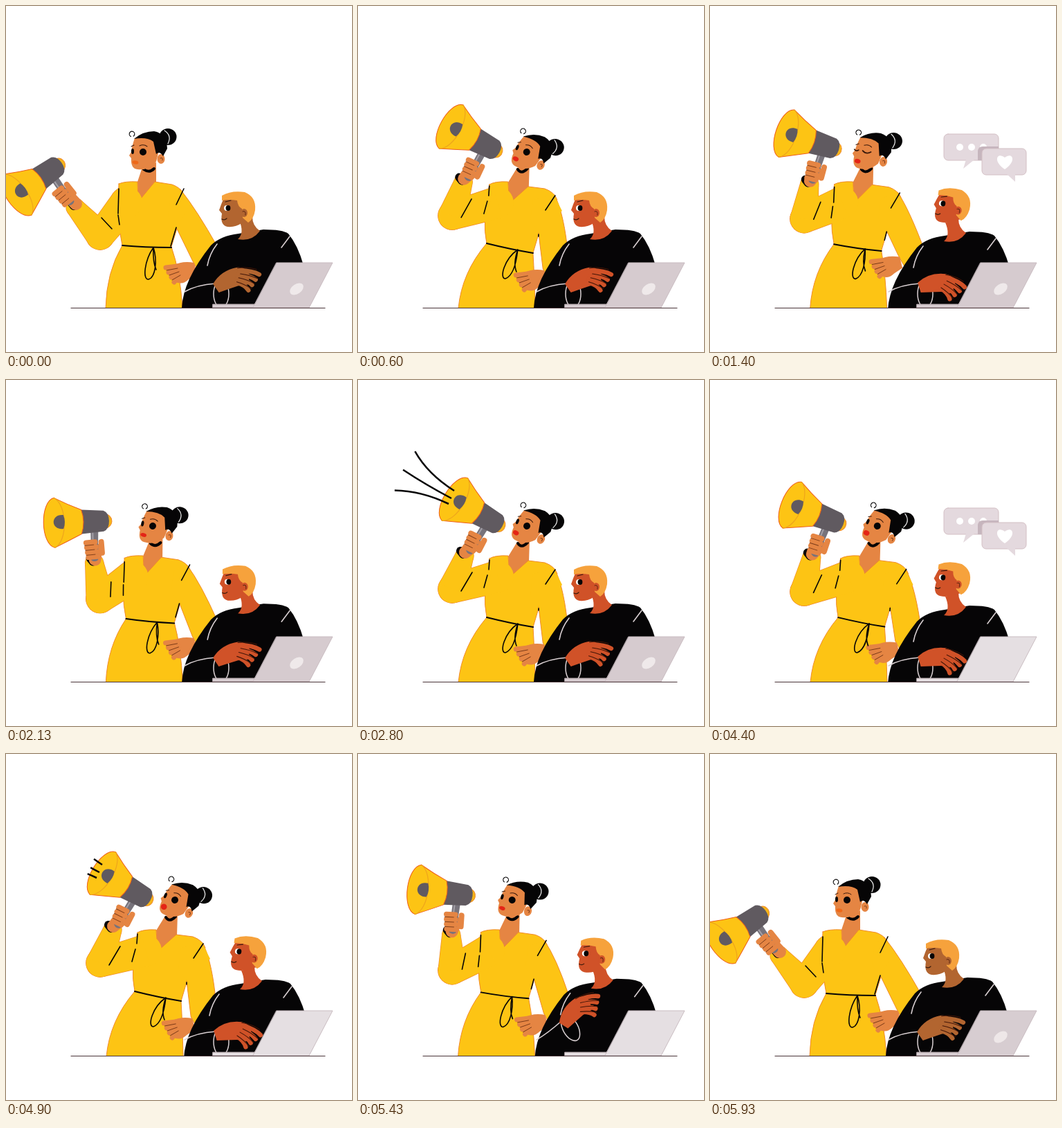
Write an HTML page with a canvas that moves like this. It is 500x500 px and loops after 6.01 s.

```html
<!DOCTYPE html>
<html lang="en">
<head>
<meta charset="utf-8">
<title>Announcement</title>
<style>
html, body { margin: 0; width: 100%; height: 100%; overflow: hidden; background: #fff }
canvas { display: block; width: 500px; height: 500px }
</style>
</head>
<body>
<canvas id="stage" width="500" height="500"></canvas>
<script>
const c = document.getElementById('stage').getContext('2d');
const LOOP = 6010, YELLOW = '#fdc414', EDGE = '#f08a2a', BLACK = '#060506',
  SKIN = '#e58543', CREASE = '#7a3a18', GREY = '#605a60', LINE = '#d9d0d2';

// The woman raises the megaphone three times in a loop
const RISE = [40, 2000, 3930], FALL = [1180, 3130, 5205];

const clamp = x => Math.min(1, Math.max(0, x));
const ease = x => (x = clamp(x)) * x * (3 - 2 * x);
const lerp = (a, b, k) => a + (b - a) * k;
const pulse = (t, from, to, d) => ease((t - from) / d) * (1 - ease((t - to) / d));

// Swing up to 1 on each beat, then down to that beat's low point
function swing(t, lows) {
  return lows.reduce((v, low, i) =>
    lerp(lerp(v, 1, ease((t - RISE[i]) / 630)), low, ease((t - FALL[i]) / 560)), 0);
}

// Blend two path or colour strings of the same structure
const NUM = /-?\d+(\.\d+)?/g;
function mix(a, b, k) {
  const to = b.match(NUM);
  let i = 0;
  return a.replace(NUM, v => lerp(+v, +to[i++], k).toFixed(2));
}

function fill(d, color, edge) {
  const p = new Path2D(d);
  c.fillStyle = color;
  c.fill(p);
  if (edge) { c.strokeStyle = edge; c.lineWidth = 1; c.stroke(p) }
}
function line(d, color = BLACK, width = 1.6) {
  c.strokeStyle = color;
  c.lineWidth = width;
  c.stroke(new Path2D(d));
}
function oval(x, y, rx, ry, color, rot = 0, edge) {
  c.beginPath();
  c.ellipse(x, y, rx, ry, rot, 0, 7);
  c.fillStyle = color;
  c.fill();
  if (edge) { c.strokeStyle = edge; c.lineWidth = 1.5; c.stroke() }
}
function group(x, y, deg, draw, px = 0, py = 0, size = 1) {
  c.save();
  c.translate(x, y);
  c.rotate(deg * Math.PI / 180);
  c.scale(size, size);
  c.translate(-px, -py);
  draw();
  c.restore();
}

// Tapered limb segment with round ends
function taper(x1, y1, r1, x2, y2, r2, color) {
  const a = Math.atan2(y2 - y1, x2 - x1), s = Math.sin(a), k = Math.cos(a);
  oval(x1, y1, r1, r1, color);
  oval(x2, y2, r2, r2, color);
  fill(`M${x1 - s * r1} ${y1 + k * r1} L${x2 - s * r2} ${y2 + k * r2}
    L${x2 + s * r2} ${y2 - k * r2} L${x1 + s * r1} ${y1 - k * r1} Z`, color);
}

function dress(b) {
  fill(mix('M198 230 L217 226 L217 254 L191 284 L190 254 Z',
    'M230 234 L248 230 L247 262 L219 286 L217 255 Z', b), SKIN);
  line(mix('M199 236 Q207 242 214 235', 'M231 236 Q236 244 245 235', b), BLACK, 4);
  fill(mix('M163 257 Q172 253 190 254 L191 283 L215 254 L240 258 Q251 262 256 270 L246 325 L239 348 Q252 385 255 437 L144 437 Q145 385 168 346 Q160 310 163 257 Z',
    'M190 258 Q198 253 217 254 L219 285 L246 261 L270 264 Q284 269 288 280 L261 330 L253 357 Q255 390 256 437 L145 437 Q150 385 186 343 Q179 310 190 258 Z', b), YELLOW, EDGE);
}

function hipArm(b, y) {
  const x = 246 - (y - 385) * .25, out = (396 - y) * .4, pit = 246 + 15 * b;
  fill(`M${252 + 32 * b} ${265 + 8 * b} Q${276 + 20 * b} 295 ${302 + out} ${345 + out}
    L${x + 34} ${y + 2} L${x + 24} ${y - 16} L${pit} ${320 + 8 * b} Z`, YELLOW, EDGE);
  fill(`M${pit} ${322 + 6 * b} l-12 -18 l4 -30 l${14 + 16 * b} -8 l12 24 Z`, YELLOW);
  group(x, y, 0, () => {
    fill('M26 -14 Q8 -17 -4 -10 L-12 2 L-4 12 Q8 20 18 10 L30 2 Z', SKIN);
    for (let i = 0; i < 4; i++) line(`M${2 + i} ${i * 4 - 9} L${i * 4 - 15} ${i * 7 - 7}`, SKIN, 7);
    for (let i = 0; i < 3; i++) line(`M${2 + i * 2} ${i * 5 - 6} L${i * 4 - 14} ${i * 7 - 3}`, CREASE, 1);
  });
}

function seams(b, u) {
  line(mix('M168 346 Q200 349 239 349', 'M186 343 Q222 352 253 357', b), BLACK, 2);
  line(mix('M213 349 C200 368 197 396 206 395 C216 392 219 368 213 349 Q212 370 217 381',
    'M231 352 C211 366 204 394 213 394 C224 390 229 370 231 352 Q224 372 229 384', b));
  line(mix('M257 264 L246 287 M163 264 L162 300 M246 320 L238 347',
    'M285 274 L271 295 M190 260 L189 274 M261 330 L261 333', b));
  line(mix('M162 302 L164 316', 'M187 282 Q182 300 185 313', b));
  line(mix('M138 306 L153 322', 'M165 278 L149 305', u));
}

function womanHead(b, h, mouth, warm, blink) {
  group(198 + 46 * b, 211, 22 * h, () => {
    oval(234, 189, 12.5, 12, BLACK);
    line('M229 180 Q240 187 234 199', '#eee', 1.2);
    oval(224, 221, 5.5, 7, SKIN);
    fill('M186 191 Q182 202 181 211 L178 216 L181 220 Q180 235 190 236 Q206 238 217 225 L222 205 L214 187 Z', SKIN);
    fill('M185 192 Q198 181 214 181 Q232 184 233 206 L227 217 Q222 209 217 214 L213 196 Q204 189 185 192 Z', BLACK);
    c.beginPath();
    c.arc(182, 185, 3.8, 2, 7.2);
    c.strokeStyle = BLACK;
    c.lineWidth = 1.2;
    c.stroke();
    if (blink > .5) {
      line('M192 210 Q198 215 204 210 M180 210 Q183 213 186 210', '#3a1a0c', 1.8);
    } else {
      oval(198, 211, 5, 5, BLACK);
      oval(183, 210, 2, 4, BLACK);
    }
    line('M193 202 Q199 199 204 203 M181 203 L185 201', '#3a1a0c', 1);
    line('M223 220 Q227 218 226 223', CREASE, 1);
    oval(187, 226, 4.4, 2.6 + 2 * mouth, mix('rgb(238 104 24)', 'rgb(228 36 22)', warm), .1);
  }, 198, 211);
}

function megaphone() {
  fill('M-7 12 L4 13 L3 56 Q-2 60 -7 56 Z', '#77737b');
  line('M-4 16 L-4 52', '#a39fa6', 2);
  fill('M14 -10 Q24 -9 24 1 Q23 9 14 11 Z', '#f5b518', EDGE);
  fill('M-20 -17 L12 -15 Q20 -12 20 0 Q20 12 12 15 L-20 18 Z', GREY);
  fill('M-59 -35 Q-40 -25 -20 -17 Q-14 0 -20 18 Q-40 28 -59 37 C-80 32 -80 -30 -59 -35 Z', YELLOW, '#ee5e1c');
  line('M-59 -35 C-40 -25 -40 28 -59 37', '#eea51c', 1.2);
  fill('M-46 -10 Q-42 0 -46 10 C-65 12 -65 -12 -46 -10 Z', GREY);
}

const wristAt = u => [100 + 54 * u, 291 - 37 * Math.sqrt(u)];

function sleeve(u, b, color, grow) {
  const [wx, wy] = wristAt(u), ex = 136, ey = 332 - 30 * u;
  taper(174 + 28 * b, 284, 23 + grow, ex, ey, 20 + grow, color);
  taper(ex, ey, 20 + grow, wx, wy, 13 + grow, color);
}

function speakHand(u) {
  const x = 64 + 127 * u, y = 238 - 36 * (1 - (1 - u) ** 4), deg = 66 * u - 35;
  const a = deg * Math.PI / 180, [wx, wy] = wristAt(u);
  const gx = x - 41 * Math.sin(a), gy = y + 41 * Math.cos(a);
  line(`M${wx - 6} ${wy - 7} l4 5`, BLACK, 12);
  line(`M${gx} ${gy} L${wx + 1} ${wy - 5}`, SKIN, 18);
  group(x, y, deg, () => {
    megaphone();
    for (let i = 0; i < 4; i++) line(`M${i - 14} ${31 + i * 7} l13 -1`, SKIN, 7.5);
    for (let i = 0; i < 3; i++) line(`M${i - 16} ${35 + i * 7} l13 -1`, CREASE, .9);
    line('M8 30 L9 46', SKIN, 8);
  });
}

function rays(t) {
  const p = (t + 152) % 240 / 240, size = 120;
  const tip = clamp(p / .45), tail = clamp((p - .4) / .6);
  c.save();
  c.lineCap = 'butt';
  c.setLineDash([size * (tip - tail), 999]);
  c.lineDashOffset = -size * tail;
  line('M139 160 Q87 127 72 79 M135 171 Q78 141 30 105 M131 179 Q73 151 17 163', BLACK, 2.5);
  c.restore();
}

function man(m, deg, lift, skin) {
  c.save();
  c.translate(3 * m, 3 * m);
  fill(`M254 436 Q256 396 296 346 Q310 332 336 329 L372 323 Q400 323 408 329 Q422 346 430 375 V${436 - 3 * m} Z`, BLACK);
  line('M305 344 Q294 358 291 375 M410 333 L398 349', LINE);
  fill('M337 310 L356 304 Q356 318 367 325 Q355 341 335 337 Q345 328 337 310 Z', skin);
  c.restore();
  group(348 + 12 * m, 318 - 3 * m, 8 * m, () => {
    fill('M315 277 Q311 286 308 295 L312 300 Q309 317 320 319 Q332 320 340 314 L352 310 L352 280 Z', skin);
    fill('M312 274 Q326 266 345 269 Q362 276 360 295 Q358 308 350 313 L342 306 L341 293 Q335 290 334 281 Q322 279 312 281 Z', '#f6a23c');
    oval(344, 299, 5, 6, skin);
    line('M342 297 Q347 295 346 302', '#5a2410', 1);
    oval(319, 292, 4, 4, '#fff');
    oval(321, 292, 3.4, 4, BLACK);
    line('M317 283 L325 281 M312 308 Q316 310 319 307', '#3a1a0c', 1.2);
  }, 348, 318);

  const x = 306 - 8 * lift, y = 404 - 16 * lift;
  line(`M258 413 Q275 403 ${x - 3} ${y - 3}`, LINE);
  oval(x + 5 + 4 * lift, y + 12 - 4 * lift, 11, 20, BLACK, -.5 * lift, LINE);
  group(x, y, deg, () => {
    fill('M-6 -4 Q10 -20 34 -18 Q46 -16 48 -5 L44 10 L28 8 Q12 9 -1 10 Z', skin);
    for (let i = 0; i < 4; i++)
      line(`M${36 - 3 * i} ${5 * i - 13} Q${54 - 5 * i} ${6 * i - 8} ${62 - 7 * i} ${6 * i}`, skin, 6.5);
    for (let i = 0; i < 3; i++)
      line(`M${36 - 4 * i} ${5 * i - 8} Q${50 - 6 * i} ${5 * i - 2} ${58 - 6 * i} ${6 * i + 5}`, '#431608', 1.1);
    line('M34 -17 Q50 -15 60 -8', '#431608', 1.1);
  });
}

function laptop(k) {
  const color = mix('rgb(214 203 207)', 'rgb(229 223 226)', k);
  fill('M299 431 H360 V436 H299 Z', color, '#b3a5aa');
  fill('M391 371 H472 L438 436 H357 Z', color, '#c9bcc1');
  oval(420, 409, 11, 7, `rgba(245,240,240,${.8 - .8 * k})`, -.6);
}

function bubble(x, y, w, h, tail) {
  c.beginPath();
  c.roundRect(x, y, w, h, 6);
  c.fillStyle = '#e4d9de';
  c.strokeStyle = '#d3bfc4';
  c.lineWidth = 1;
  c.fill();
  c.stroke();
  fill(tail, '#e4d9de');
}

function bubbles(s) {
  c.globalAlpha = s;
  group(370, 232, 0, () => {
    bubble(338, 185, 79, 38, 'M370 222 L366 235 L382 222 Z');
    for (const x of [361, 378, 395]) oval(x, 204, 5, 5, '#fff');
    fill('M387 223 V209 Q388 203 394 203 H417 V223 Z', '#c6b5bd');
  }, 370, 232, s);
  group(436, 250, 0, () => {
    bubble(393, 206, 64, 38, 'M429 243 L441 254 V243 Z');
    fill('M426 236 C408 224 415 210 426 219 C437 210 444 224 426 236 Z', '#fff');
  }, 436, 250, s);
  c.globalAlpha = 1;
}

function draw(now) {
  const t = now % LOOP;
  const arm = swing(t, [.45, .15, 0]), lean = swing(t + 40, [.15, .48, 0]);
  const blink = pulse(t, 1300, 1450, 50), warm = pulse(t, 60, 5800, 100);
  const look = pulse(t, 700, 1700, 500) + pulse(t, 3220, 5200, 500);
  const wave = pulse(t, 5100, 5480, 300);
  const hip = 385 + 11 * lean - 40 * look * (1 - lean) * (1 - wave);
  const mouth = arm ** 4 * (.6 + .4 * Math.cos(t / 70));
  c.clearRect(0, 0, 500, 500);
  c.lineCap = c.lineJoin = 'round';

  sleeve(arm, lean, EDGE, .7);
  dress(lean);
  hipArm(lean, hip);
  womanHead(lean, lean ** .7 - .3 * blink, mouth, warm, blink);
  sleeve(arm, lean, YELLOW, 0);
  seams(lean, arm);
  speakHand(arm);
  if (arm > .985) rays(t);

  man(look, -15 + 17 * clamp(look * 1.6) - 38 * wave, wave,
    mix('rgb(178 101 48)', 'rgb(208 82 40)', warm));
  laptop(pulse(t, 3000, 5600, 400));
  bubbles(pulse(t, 900, 1800, 150) + pulse(t, 3320, 4600, 150));
  c.clearRect(0, 436, 500, 64);
  line('M94 436.5 H461', '#4a3438', 1.2);
  requestAnimationFrame(draw);
}
requestAnimationFrame(draw);
</script>
</body>
</html>
```
